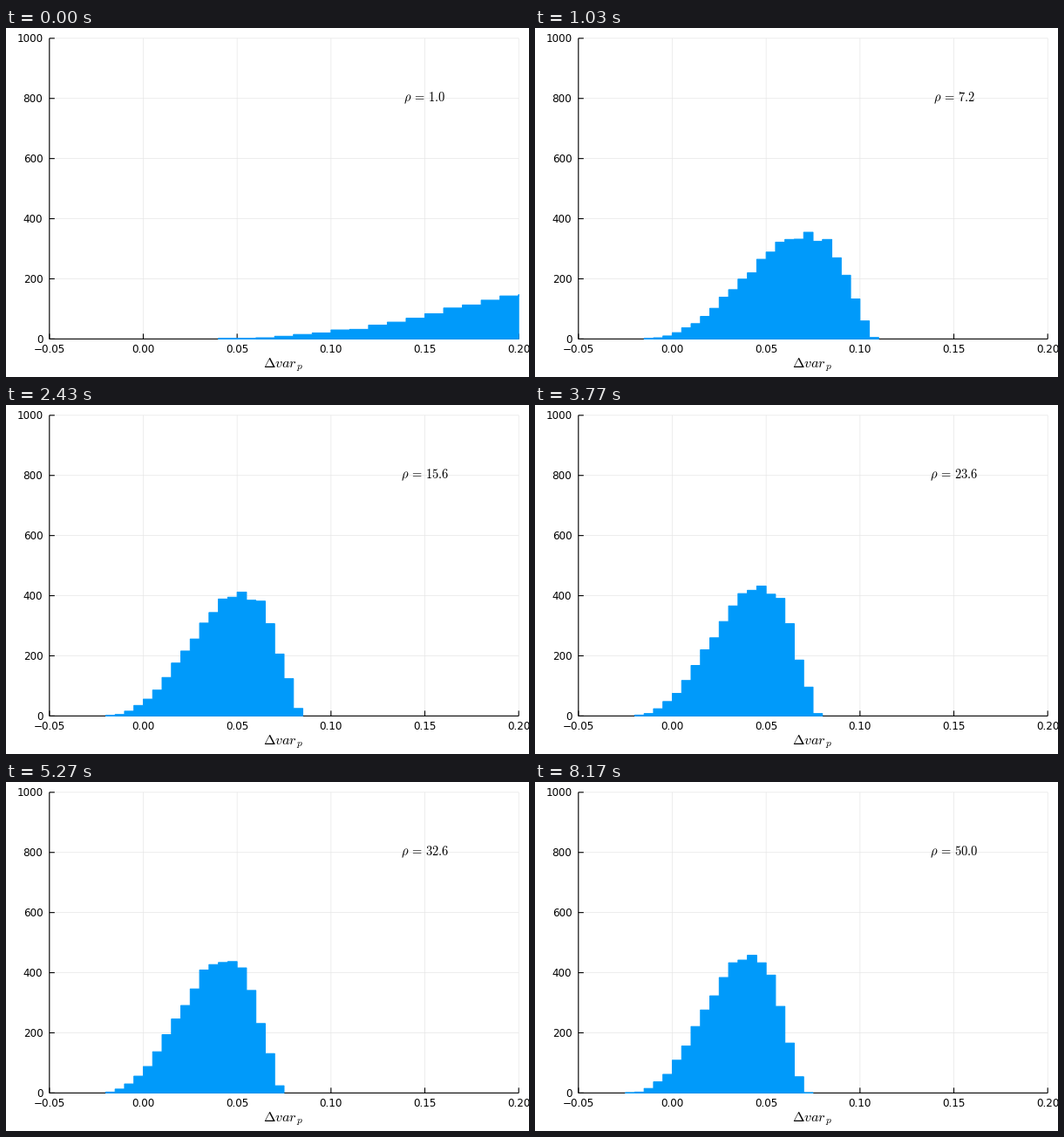
Recreate the animation shown at these times as a matplotlib script. Size 600 px wide and 400 px high, loop 8210 ms.

```python
import matplotlib.pyplot as plt
import numpy as np
from matplotlib.animation import FuncAnimation

W, H, DPI = 600, 400, 100
PX = 72 / DPI  # points per pixel
LEFT, RIGHT, TOP, BOTTOM = 49.8, 588.2, 11.8, 356.4
XMIN, XMAX, YMAX = -0.05, 0.2, 1000
BLUE = "#009afa"

LOOP_MS = 8210
TICKS = 492
STEP_MS = LOOP_MS / TICKS
RHOS = 1 + 0.2 * np.arange(246)
STARTS = 10 * np.round(np.arange(RHOS.size) * 10 / 3)  # 30 fps in whole centiseconds

# Left-skewed sample on [0, 1]; thinning a larger sorted draw tames the noise
N, THIN = 4254, 4
rng = np.random.default_rng(7)
Z = np.sort(rng.beta(4.2, 2.5, N * THIN))[THIN // 2::THIN]


def sample_at(rho):
    """The range grows linearly in 1/rho, the bulk leans right with its root."""
    u = 1 / rho
    lo = -0.028 + 0.044 * u
    hi = 0.0645 + 0.31 * u
    z = Z + 0.35 * np.sqrt(u) * Z**2 * (1 - Z)
    return lo + (hi - lo) * z


def bin_width(x):
    """Freedman-Diaconis width, rounded to a neat step."""
    q1, q3 = np.percentile(x, [25, 75])
    return 0.01 if 2 * (q3 - q1) / np.cbrt(N) > 0.0055 else 0.005


def outline(x):
    """Histogram outline, cut at the right limit."""
    width = bin_width(x)
    lo, hi = np.floor(x[0] / width), np.ceil(x[-1] / width)
    edges = width * np.arange(lo, hi + 1)
    counts, _ = np.histogram(x, edges)
    counts = counts[edges[:-1] <= XMAX + 1e-9]
    edges = np.minimum(edges[:counts.size + 1], XMAX)
    heights = np.concatenate([[0], np.repeat(counts, 2), [0]])
    return np.column_stack([np.repeat(edges, 2), heights])


plt.rcParams.update({"font.family": "DejaVu Sans", "mathtext.fontset": "cm"})
fig = plt.figure(figsize=(W / DPI, H / DPI), dpi=DPI, facecolor="white")
ax = fig.add_axes([LEFT / W, 1 - BOTTOM / H, (RIGHT - LEFT) / W, (BOTTOM - TOP) / H])
ax.set_axis_off()

sx = (XMAX - XMIN) / (RIGHT - LEFT)  # data units per pixel
sy = YMAX / (BOTTOM - TOP)


def line(xs, ys, color="black", width=1.1, z=2):
    ax.plot(xs, ys, color=color, lw=width * PX, zorder=z, clip_on=False,
            solid_capstyle="butt", snap=False)


def grid(xs, ys):
    line(xs, ys, "#e6e6e6", 0.7, 1)


def label(x, y, text, size, **kw):
    return ax.text(x, y, text, fontsize=size * PX, zorder=4, **kw)


for x in np.linspace(XMIN, XMAX, 6).round(2):
    grid([x, x], [0, YMAX])
    line([x, x], [0, 6 * sy])
    label(x, -10.6 * sy, f"{x:.2f}".replace("-", "\u2212"), 12,
          ha="center", va="center_baseline")
for y in range(0, YMAX + 1, 200):
    grid([XMIN, XMAX], [y, y])
    line([XMIN, XMIN + 6 * sx], [y, y])
    label(XMIN - 7.5 * sx, y + 0.7 * sy, str(y), 12,
          ha="right", va="center_baseline")
line([XMIN, XMAX], [0, 0])
line([XMIN, XMIN], [0, YMAX])

label(XMIN + (318.4 - LEFT) * sx, (BOTTOM - 389) * sy, r"$\Delta var_{\,p}$", 16.2,
      ha="center", va="baseline")
rho_text = label(0.15, (BOTTOM - 84.2) * sy, "", 14.5, ha="center", va="baseline")
bars, = ax.fill([0, 0, 0], [0, 0, 0], facecolor=BLUE, edgecolor=BLUE, lw=PX,
                joinstyle="miter", zorder=3, clip_on=False, snap=False)
ax.set(xlim=(XMIN, XMAX), ylim=(0, YMAX))


def update(i):
    t = (i + 0.93) * STEP_MS
    rho = RHOS[np.searchsorted(STARTS, t, side="right") - 1]
    bars.set_xy(outline(sample_at(rho)))
    rho_text.set_text(rf"$\rho\,=\,{rho:.1f}$")
    return bars, rho_text


anim = FuncAnimation(fig, update, frames=TICKS, interval=STEP_MS, repeat=True,
                     cache_frame_data=False)
plt.show()
```
